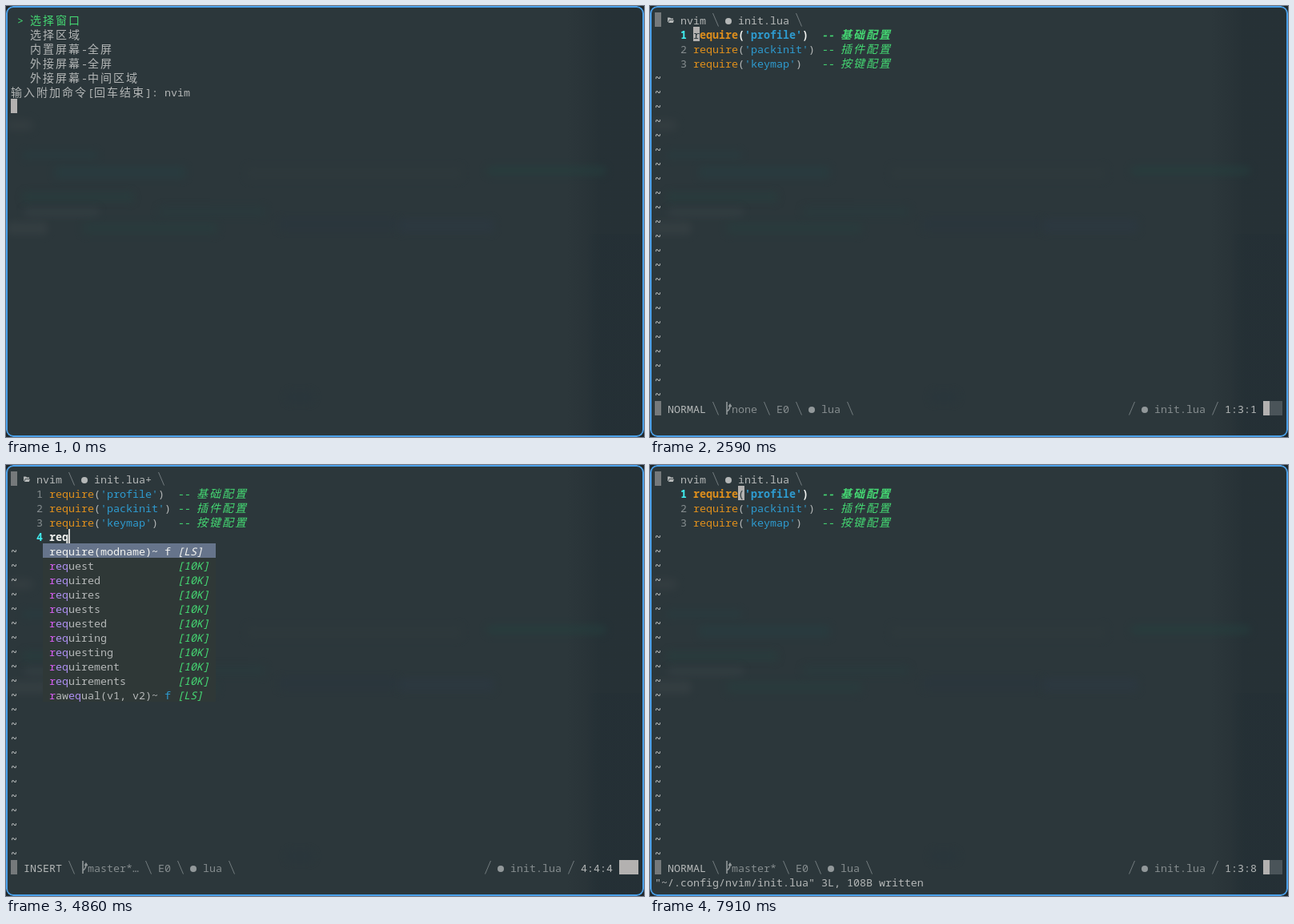
An HTML page that plays this animation: 797 px wide and 539 px high, repeating every 8000 ms.

```html
<!DOCTYPE html>
<html lang="zh">
<head>
<meta charset="utf-8">
<title>Terminal editor session</title>
<style>
  html, body { margin: 0; width: 100%; height: 100%; overflow: hidden; background: #1f272b; }
  #term {
    position: absolute; left: 0; top: 0; width: 797px; height: 539px; box-sizing: border-box;
    border-radius: 9px; overflow: hidden;
    background:
      linear-gradient(90deg, transparent 700px, rgba(36, 46, 51, .35) 724px, rgba(36, 47, 52, .75) 742px),
      linear-gradient(90deg, transparent 725px, rgba(32, 47, 54, .55) 745px) 0 285px no-repeat,
      #2c373b;
  }
  #frame {
    position: absolute; inset: 0; box-sizing: border-box;
    border: 2px solid #4a9fe8; border-radius: 9px;
  }
  .glow { position: absolute; filter: blur(5px); border-radius: 6px; }
  .scene { position: absolute; inset: 0; visibility: hidden; }
  .scene.on { visibility: visible; }
  .scene span, .scene i, .scene svg { position: absolute; display: block; }
  .scene span {
    font: 13.3333px/18px "Noto Sans Mono", "DejaVu Sans Mono", monospace;
    font-variant-ligatures: none; white-space: pre; color: #b4b7b7;
  }
  .scene span.wide { font: 14px/18px "Noto Sans CJK SC", "Noto Sans CJK", sans-serif; letter-spacing: 2px; }
  .scene .bold { font-weight: 700 !important; }
  .scene .slant { font-style: italic !important; }
  .scene .dim { color: #858c8e; }
  .scene .lit { color: #f2f3f0; }
  .scene .green { color: #45d873; }
  .scene .cyan { color: #40eef0; }
  .scene .orange { color: #df8f1c; }
  .scene .blue { color: #2e9bd0; }
  .scene .pink { color: #d65cf0; }
  .scene .violet { color: #ae8ff2; }
  .scene .dark { color: #2c373b; }
</style>
</head>
<body>
<div id="term"></div>
<script>
const CW = 8, RH = 18, X0 = 6, Y0 = 8, LOOP = 8000;
const LAST = 26, STATUS = 27, CMD = 28;
const term = document.getElementById('term');
const px = col => X0 + col * CW;
const py = row => Y0 + row * RH;
let scene;

// Drawing helpers on the character grid
function put(col, row, text, cls = '') {
  for (const part of text.match(/[\u4e00-\u9fff]+|[^\u4e00-\u9fff]+/g) || []) {
    const wide = /[\u4e00-\u9fff]/.test(part);
    const el = document.createElement('span');
    el.className = cls + (wide ? ' wide' : '');
    el.textContent = part;
    el.style.left = px(col) + 'px';
    el.style.top = py(row) + (wide ? 0 : 1) + 'px';
    scene.append(el);
    col += part.length * (wide ? 2 : 1);
  }
  return col;
}

function rect(x, y, w, h, color) {
  const el = document.createElement('i');
  el.style.cssText = `left:${x}px;top:${y}px;width:${w}px;height:${h}px;background:${color}`;
  scene.append(el);
  return el;
}
const cells = (col, row, n, color, rows = 1) => rect(px(col), py(row), n * CW, rows * RH, color);

function glyph(col, row, d, style) {
  scene.insertAdjacentHTML('beforeend',
    `<svg width="8" height="18" style="left:${px(col)}px;top:${py(row)}px"><path d="${d}" ${style}/></svg>`);
}
const stroke = (color, w) => `fill="none" stroke="${color}" stroke-width="${w}"`;
const back = (col, row) => glyph(col, row, 'M.5 1L7.5 17.5', stroke('#737c7f', 1));
const slash = (col, row) => glyph(col, row, 'M7.5 1L.5 17.5', stroke('#737c7f', 1));
const branchMark = (col, row) =>
  glyph(col, row, 'M2 1V17M2 13Q6 11 6 5M4.3 7L6 4.5L7.7 7', stroke('#92989a', 1.6));
const folder = (col, row) =>
  glyph(col, row, 'M0 6.5H3L4 7.5H7V9H2L.6 12H0ZM2.4 9.7H8L6.8 13H1Z', 'fill="#b4b7b7"');
function dot(col, row, color) {
  rect(px(col), py(row) + 6.5, 8, 8, color).style.borderRadius = '50%';
}

function fileName(col, row, name, cls, color) {
  if (name !== '~') {
    dot(col, row, color);
    col += 2;
  }
  return put(col, row, name, cls);
}

function tildes(from) {
  for (let row = from; row <= LAST; row++) put(0, row, '~', 'bold');
}

function menu() {
  put(1, 0, '> 选择窗口', 'green');
  ['选择区域', '内置屏幕-全屏', '外接屏幕-全屏', '外接屏幕-中间区域']
    .forEach((label, i) => put(3, i + 1, label));
  put(0, 5, '输入附加命令[回车结束]: nvim');
  cells(0, 6, 1, '#b3b1b0');
}

const CODE = [['profile', '基础配置'], ['packinit', '插件配置'], ['keymap', '按键配置']];
const WORDS = ['request', 'required', 'requires', 'requests', 'requested', 'requiring',
  'requesting', 'requirement', 'requirements'];
const DOCS = ['function require(modname: string)', '  -> unknown', '─'.repeat(62),
  'Loads the given module, returns any value returned by the', 'searcher (true when nil). Besides that value, also returns',
  'as a second result the loader data returned by the searcher,', 'which indicates how require found the module.'];

function codeLine(n, o) {
  const now = n === o.line;
  const b = now ? ' bold' : '';
  put(4, n, String(n), now ? 'cyan bold' : 'dim');
  if (n > CODE.length) return put(6, n, o.typed, 'lit' + b);
  if (!o.file) return;
  const [mod, note] = CODE[n - 1];
  let col = put(6, n, 'require', 'orange' + b);
  col = put(col, n, '(', now ? 'lit bold' : '');
  col = put(col, n, `'${mod}'`, 'blue' + b);
  put(col, n, ')', now ? 'lit bold' : '');
  put(26, n, '-- ' + note, 'green slant' + b);
}

function cursor(o) {
  const col = o.col + 5;
  if (o.mode === 'INSERT') return rect(px(col), py(o.line), 2, RH, '#d0d0ce');
  cells(col, o.line, 1, '#b3b1b0');
  const text = o.line > CODE.length ? o.typed : o.file ? 'require(' : '';
  put(col, o.line, text[o.col - 1] || '', 'dark');
}

function topBar(o) {
  cells(0, 0, 1, '#75797b');
  folder(2, 0);
  put(4, 0, 'nvim');
  back(9, 0);
  const end = fileName(11, 0, o.file ? 'init.lua' + (o.dirty ? '+' : '') : '~', '', '#b4b7b7');
  back(end + 1, 0);
}

function statusBar(o) {
  const row = STATUS;
  cells(0, row, 1, '#75797b');
  put(2, row, o.mode);
  back(9, row);
  branchMark(11, row);
  let col = put(12, row, o.branch, 'dim') + 1;
  back(col, row);
  col = put(col + 2, row, 'E0', 'dim') + 1;
  back(col, row);
  col = fileName(col + 2, row, o.file ? 'lua' : '~', 'dim', '#92989a') + 1;
  back(col, row);

  slash(o.file ? 74 : 83, row);
  fileName(o.file ? 76 : 85, row, o.file ? 'init.lua' : '~', 'dim', '#92989a');
  slash(87, row);
  const line = o.tree || o.line, total = o.tree ? TREE.length : o.total;
  put(89, row, `${line}:${total}:${o.col}`);
  cells(95, row, 3, '#4a5459');
  cells(95, row, Math.max(1, Math.round(3 * line / total)), '#b3b1b0');
}

// Completion list; letters matching the typed text in order are tinted
function menuItem(row, text, typed) {
  let hit = 0;
  [...text].forEach((ch, i) => {
    const match = ch === typed[hit];
    put(6 + i, row, ch, match ? (hit++ ? 'violet' : 'pink') : '');
  });
}

function completion(o) {
  cells(5, 5, 27, '#2f3837', 11);
  cells(5, 5, 27, '#66748b');
  put(6, 5, 'require(modname)~ f', 'lit');
  put(26, 5, '[LS]', 'lit slant');
  WORDS.forEach((word, i) => {
    menuItem(6 + i, word, o.typed);
    put(26, 6 + i, '[10K]', 'green slant');
  });
  menuItem(15, 'rawequal(v1, v2)~', o.typed);
  put(24, 15, 'f', 'blue');
  put(26, 15, '[LS]', 'green slant');
}

function docs() {
  cells(32, 5, 64, '#2f3837', DOCS.length);
  DOCS.forEach((text, i) => put(33, 5 + i, text, i === 2 ? 'dim' : ''));
}

const TREE = ['nvim', '  after', '  lua', '  plugin', '  init.lua'];
function tree(at) {
  for (let row = 1; row <= LAST; row++) rect(px(68) + 4, py(row), 1, RH, '#566064');
  cells(69, at, 29, '#3d494e');
  TREE.forEach((name, i) => put(70, i + 1, name, i + 1 === at ? 'lit bold' : ''));
}

function editor(o) {
  topBar(o);
  for (let n = 1; n <= o.total; n++) codeLine(n, o);
  tildes(o.total + 1);
  if (o.sign) rect(9, py(4), 3, RH, '#d6c832');
  if (o.cursor) cursor(o);
  if (o.tree) tree(o.tree);
  if (o.pum) completion(o);
  if (o.docs) docs();
  statusBar(o);
  put(0, CMD, o.msg);
  put(87, CMD, o.keys);
}

// Each step changes part of the state left by the previous one
const STEPS = [
  [0, { view: menu }],
  [40, { view: () => cells(0, 0, 1, '#b3b1b0') }],
  [80, { view: () => tildes(2) }],
  [120, { view: editor, mode: 'NORMAL', branch: 'none', line: 1, col: 1, total: 1,
    typed: '', msg: '', keys: '', cursor: true }],
  [1300, { cursor: false }],
  [1340, { tree: 1 }],
  [1910, { tree: 5 }],
  [2590, { tree: 0, file: true, cursor: true, total: 3 }],
  [2850, { branch: 'master*…' }],
  [3030, { line: 3 }],
  [3310, { line: 1 }],
  [3620, { line: 3 }],
  [4320, { mode: 'INSERT', line: 4, total: 4, dirty: true }],
  [4570, { typed: 'r', col: 2 }],
  [4610, { typed: 're', col: 3 }],
  [4650, { pum: true }],
  [4860, { typed: 'req', col: 4 }],
  [4900, { docs: true }],
  [5150, { sign: true, branch: 'master*… +1' }],
  [5580, { typed: 'require', col: 8, pum: false, docs: false }],
  [6120, { mode: 'NORMAL', col: 7 }],
  [6410, { keys: 'd' }],
  [6550, { keys: '', line: 3, total: 3, sign: false }],
  [6940, { line: 2 }],
  [7040, { branch: 'master*…' }],
  [7220, { line: 1 }],
  [7590, { dirty: false, msg: '"~/.config/nvim/init.lua" 3L, 108B written' }],
  [7870, { col: 8 }],
  [7910, { branch: 'master*' }],
];

// Faint blurred window behind the translucent terminal
[[0, 142, 34, 14, '#3a4245'], [20, 182, 95, 9, '#263f42'], [60, 200, 165, 16, '#263f42'],
 [20, 232, 140, 14, '#27403f'], [22, 252, 95, 12, '#384347'], [0, 270, 52, 16, '#3c4548'],
 [95, 270, 170, 16, '#273e3e'], [190, 250, 135, 14, '#283c3e'], [340, 265, 150, 16, '#29363f'],
 [490, 266, 120, 18, '#2c3944'], [600, 200, 150, 12, '#24413f'], [300, 200, 270, 18, '#2f3a3d'],
 [350, 482, 34, 14, '#28363d']].forEach(([x, y, w, h, color]) => {
  const el = document.createElement('div');
  el.className = 'glow';
  el.style.cssText = `left:${x}px;top:${y}px;width:${w}px;height:${h}px;background:${color};opacity:.5`;
  term.append(el);
});

let state = {};
const scenes = STEPS.map(([, patch]) => {
  state = { ...state, ...patch };
  scene = document.createElement('div');
  scene.className = 'scene';
  state.view(state);
  term.append(scene);
  return scene;
});
term.insertAdjacentHTML('beforeend', '<div id="frame"></div>');

const start = performance.now();
let shown = -1;
function tick() {
  const t = (performance.now() - start) % LOOP;
  let at = STEPS.length - 1;
  while (STEPS[at][0] > t) at--;
  if (at !== shown) {
    if (shown >= 0) scenes[shown].classList.remove('on');
    scenes[at].classList.add('on');
    shown = at;
  }
  requestAnimationFrame(tick);
}
tick();
</script>
</body>
</html>
```
